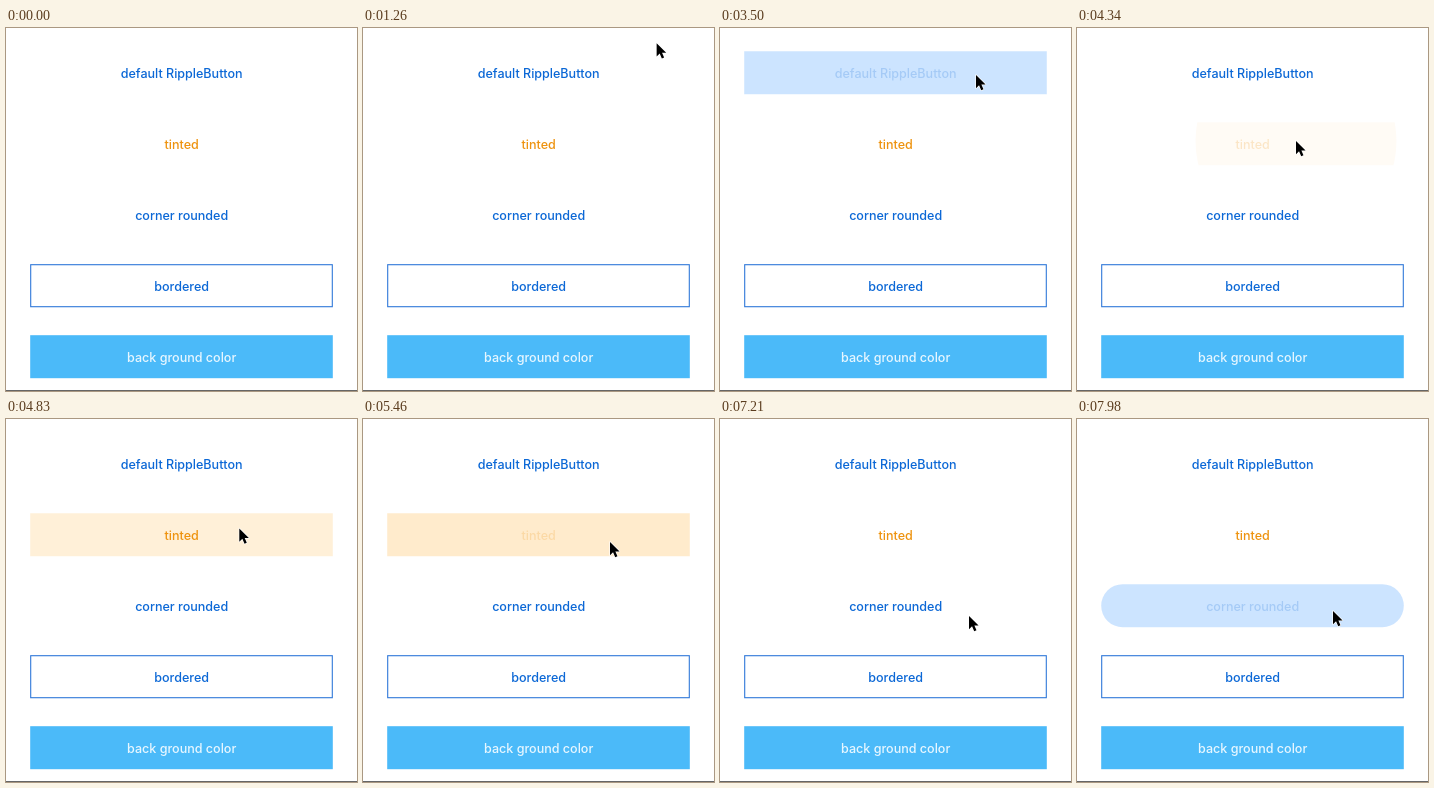
An HTML page for the animation above (8000 ms loop, 351 by 363 pixels).

```html
<!DOCTYPE html>
<html lang="en">
<head>
<meta charset="utf-8">
<title>Ripple buttons</title>
<style>
  html, body { margin: 0; width: 100%; height: 100%; overflow: hidden; background: #fff; }
  svg { display: block; width: 351px; height: 363px; }
  text { font: 450 12.55px Inter, Roboto, sans-serif; text-anchor: middle; }
</style>
</head>
<body>
<svg id="stage" viewBox="0 0 351 363"></svg>
<script>
const LOOP = 8000;
const BOX = { x: 24.2, width: 302.6, height: 43 };
const TOP = 23.2, PITCH = 71;
const BLUE = '#0c68d6', ORANGE = '#ee930f';
const HOLD = 620, GROW = 600, FADE = 300;
const MAX_RADIUS = 300, TINT = 0.2, PRESSED_TEXT = 0.2, SWING = 0.31;

const stage = document.getElementById('stage');

function add(parent, tag, attributes = {}) {
  const node = document.createElementNS('http://www.w3.org/2000/svg', tag);
  for (const name in attributes) node.setAttribute(name, attributes[name]);
  return parent.appendChild(node);
}

const clamp = v => Math.min(1, Math.max(0, v));
const smooth = v => v * v * (3 - 2 * v);

const buttons = [
  { label: 'default RippleButton', color: BLUE, ripple: '#007aff' },
  { label: 'tinted', color: ORANGE, ripple: '#ff9a00' },
  { label: 'corner rounded', color: BLUE, ripple: '#007aff', rounded: true },
  { label: 'bordered', color: BLUE, border: '#2f78d9' },
  { label: 'back ground color', color: '#e6f6ff', fill: '#4bbaf9' }
];
const [plain, tinted, rounded] = buttons;

// The pointer rests at each stop for HOLD ms and presses its button, if any.
const stops = [
  { time: -60, x: 354, y: 60 },
  { time: 1925, x: 238, y: 43, button: plain },
  { time: 2950, x: 256, y: 47, button: plain },
  { time: 4140, x: 219, y: 113, button: tinted },
  { time: 4900, x: 247, y: 123, button: tinted },
  { time: 6650, x: 249, y: 197, button: null },
  { time: 7370, x: 256, y: 192, button: rounded }
];

buttons.forEach((button, i) => {
  const frame = { ...BOX, y: TOP + i * PITCH, rx: button.rounded ? BOX.height / 2 : 0 };
  if (button.fill) add(stage, 'rect', { ...frame, fill: button.fill });
  if (button.border) {
    add(stage, 'rect', {
      x: frame.x + 0.5, y: frame.y + 0.5, width: frame.width - 1, height: frame.height - 1,
      fill: 'none', stroke: button.border, 'stroke-width': 1.1
    });
  }
  if (button.ripple) {
    add(add(stage, 'clipPath', { id: 'clip' + i }), 'rect', frame);
    const group = add(stage, 'g', { 'clip-path': `url(#clip${i})` });
    button.circle = add(group, 'circle', { fill: button.ripple });
  }
  button.text = add(stage, 'text', { x: 175.7, y: frame.y + 26.5, fill: button.color });
  button.text.textContent = button.label;
});

add(stage, 'rect', { y: 362, width: 351, height: 1, fill: '#666' });

const cursor = add(stage, 'path', {
  d: 'M0 0V15.2L3.5 11.9L6 17.6L8.6 16.5L6.2 10.9H11Z',
  stroke: '#fff', 'stroke-width': 1.4, 'stroke-linejoin': 'round', 'paint-order': 'stroke'
});

// Moves ease between stops and swing upwards with the sideways distance.
function pointerAt(t) {
  const index = stops.findLastIndex(stop => t >= stop.time);
  const from = stops[index], to = stops[index + 1] || from;
  const leave = from.time + HOLD;
  const k = to === from ? 0 : smooth(clamp((t - leave) / (to.time - leave)));
  const dx = to.x - from.x, dy = to.y - from.y;
  const lift = SWING * Math.abs(dx) * Math.sin(Math.PI * k);
  return [from.x + dx * k, from.y + dy * k - lift];
}

function drawRipple(button, t) {
  const press = stops.findLast(stop => stop.button === button && t >= stop.time);
  const age = press ? t - press.time : Infinity;
  const growth = clamp(age / GROW);
  const fade = 1 - clamp((age - HOLD) / FADE);
  const { circle, text } = button;
  text.setAttribute('opacity', age < HOLD ? PRESSED_TEXT : 1);
  circle.setAttribute('cx', press ? press.x : 0);
  circle.setAttribute('cy', press ? press.y : 0);
  circle.setAttribute('r', growth * MAX_RADIUS);
  circle.setAttribute('opacity', TINT * clamp(growth / 0.57) ** 3 * fade);
}

function draw(t) {
  for (const button of buttons) if (button.ripple) drawRipple(button, t);
  cursor.setAttribute('transform', `translate(${pointerAt(t)}) scale(0.87)`);
}

const began = performance.now();
function tick() {
  draw(Math.max(0, performance.now() - began) % LOOP);
  requestAnimationFrame(tick);
}
draw(0);
requestAnimationFrame(tick);
</script>
</body>
</html>
```
